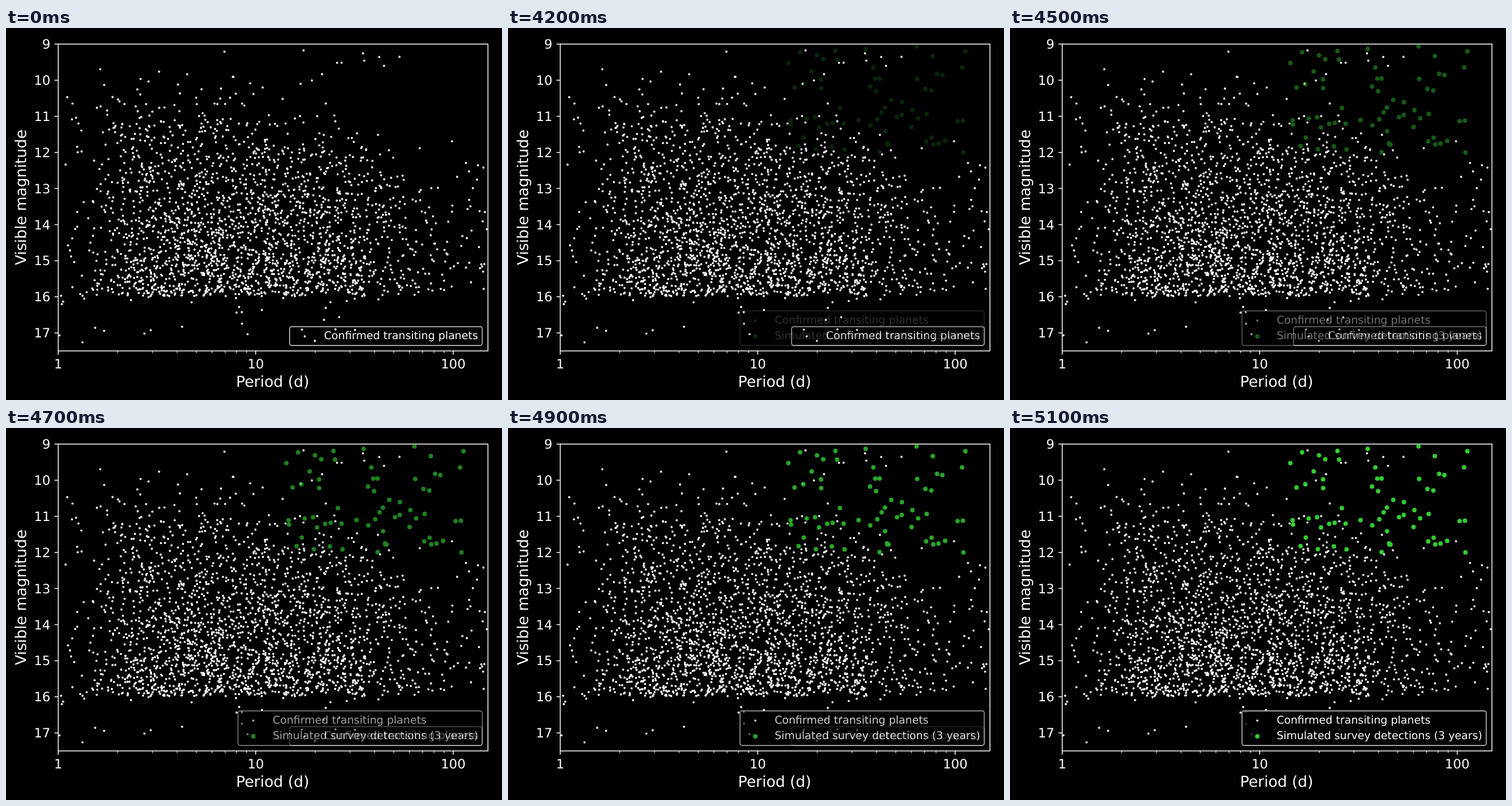
Write an HTML page that moves like this. It is 864x648 px and loops after 5200 ms.

```html
<!DOCTYPE html>
<html lang="en">
<head>
<meta charset="utf-8">
<title>Transiting planets</title>
<style>
  html, body { margin: 0; width: 100%; height: 100%; overflow: hidden; background: #000; }
  svg {
    display: block; width: 864px; height: 648px; background: #000;
    animation: dim 5200ms step-end infinite;
  }
  text {
    font-family: "DejaVu Sans", sans-serif; font-size: 18.75px; fill: #fff;
    text-rendering: geometricPrecision;
  }
  .tick { font-size: 22.5px; }
  .title { font-size: 26.25px; text-anchor: middle; }
  .line { fill: none; stroke: #fff; stroke-width: 1.5; }
  .minor { stroke-width: 1.125; }
  .dots { fill: none; stroke: #fff; stroke-width: 3.8; stroke-linecap: round; }
  .green { stroke: #32cd32; stroke-width: 7.8; }
  .box { fill: #000; fill-opacity: .8; stroke: #ccc; stroke-opacity: .82; stroke-width: 1.875; }
  #after { animation: appear 5200ms infinite; }
  #before { mix-blend-mode: plus-lighter; animation: vanish 5200ms infinite; }
  #before .box { fill: none; }

  /* one dark flash, then an eleven-step cross-fade, 100 ms per step */
  @keyframes dim {
    0%, 80.769%, 100% { opacity: 1; }
    78.846% { opacity: .185; }
  }
  @keyframes appear {
    0% { opacity: 0; animation-timing-function: step-end; }
    78.846% { opacity: .18; animation-timing-function: step-end; }
    80.769% { opacity: .0909; animation-timing-function: steps(10, jump-start); }
    100% { opacity: 1; }
  }
  @keyframes vanish {
    0%, 78.846% { opacity: 1; animation-timing-function: step-end; }
    80.769% { opacity: .9091; animation-timing-function: steps(10, jump-start); }
    100% { opacity: 0; }
  }
</style>
</head>
<body>
<svg viewBox="0 0 864 648">
  <clipPath id="plot"><rect x="91" y="28" width="748.5" height="534.5"/></clipPath>
  <path id="planets" class="dots" clip-path="url(#plot)"/>
  <g id="axes">
    <rect class="line" x="91" y="28" width="748.5" height="534.5"/>
    <path id="major" class="line"/>
    <path id="minor" class="line minor"/>
    <text class="title" x="464.5" y="625">Period (d)</text>
    <text class="title" transform="translate(35 295) rotate(-90)">Visible magnitude</text>
  </g>
  <g id="after">
    <path id="detections" class="dots green" clip-path="url(#plot)"/>
    <rect class="box" x="404.2" y="492.8" width="425.4" height="60.2" rx="3.75"/>
    <path class="dots" d="M430.8 509.6h0"/>
    <path class="dots green" d="M430.8 537.1h0"/>
    <text x="464.4" y="514.6">Confirmed transiting planets</text>
    <text x="464.4" y="542">Simulated survey detections (3 years)</text>
  </g>
  <g id="before">
    <rect class="box" x="494" y="520.3" width="335.6" height="32.7" rx="3.75"/>
    <path class="dots" d="M520.4 537.1h0"/>
    <text x="554" y="542">Confirmed transiting planets</text>
  </g>
</svg>
<script>
  const $ = id => document.getElementById(id);
  // x from log10 of the period, y from the magnitude
  const plotX = logP => 91 + 344 * logP;
  const plotY = mag => 28 + 62.9 * (mag - 9);

  // Axes
  const label = (text, x, y, anchor) => {
    const t = document.createElementNS("http://www.w3.org/2000/svg", "text");
    t.setAttribute("class", "tick");
    t.setAttribute("x", x);
    t.setAttribute("y", y);
    t.setAttribute("text-anchor", anchor);
    t.textContent = text;
    $("axes").append(t);
  };
  let major = "", minor = "";
  for (let mag = 9; mag <= 17; mag++) {
    major += `M91 ${plotY(mag)}h-6.56`;
    label(mag, 77.4, plotY(mag) + 8, "end");
  }
  for (let power = 0; power < 3; power++) {
    const decade = 10 ** power;
    major += `M${plotX(power)} 562.5v6.56`;
    label(decade, plotX(power), 593, "middle");
    for (let k = 2; k < 10 && k * decade < 150; k++)
      minor += `M${plotX(Math.log10(k * decade))} 562.5v3.75`;
  }
  $("major").setAttribute("d", major);
  $("minor").setAttribute("d", minor);

  // Scatter
  let seed = 2741;
  const random = () => {
    seed = (seed + 0x6D2B79F5) | 0;
    let t = Math.imul(seed ^ (seed >>> 15), 1 | seed);
    t = (t + Math.imul(t ^ (t >>> 7), 61 | t)) ^ t;
    return ((t ^ (t >>> 14)) >>> 0) / 4294967296;
  };
  const smooth = (from, to, v) => {
    const t = Math.min(1, Math.max(0, (v - from) / (to - from)));
    return t * t * (3 - 2 * t);
  };
  const scatter = (id, count, pick) => {
    let d = $(id).getAttribute("d") || "";
    for (let i = 0; i < count; i++) {
      const [logP, mag] = pick();
      d += `M${plotX(logP).toFixed(1)} ${plotY(mag).toFixed(1)}h0`;
    }
    $(id).setAttribute("d", d);
  };

  // Most planets are faint with periods of 3 to 20 days; bright ones have short periods
  const density = (logP, mag) =>
    smooth(-.05, .6, logP) * (1 - .85 * smooth(1.15, 2, logP)) *
    ((mag - 9) / 7) ** 1.2 * smooth(0, 2.5, mag - 8 - 1.6 * logP);

  scatter("planets", 2250, () => {
    let logP, mag;
    do {
      logP = 2.17 * random();
      mag = 9.1 + 6.88 * random();
    } while (random() > density(logP, mag));
    return [logP, mag];
  });
  scatter("planets", 14, () => [1.9 * random(), 9.1 + random()]);
  scatter("planets", 32, () => [1.7 * random(), 16 + 1.5 * random() ** 2]);
  scatter("detections", 66, () =>
    [1.15 + .94 * random() ** 1.3, 12 - 2.95 * random() ** 1.4]);
</script>
</body>
</html>
```
